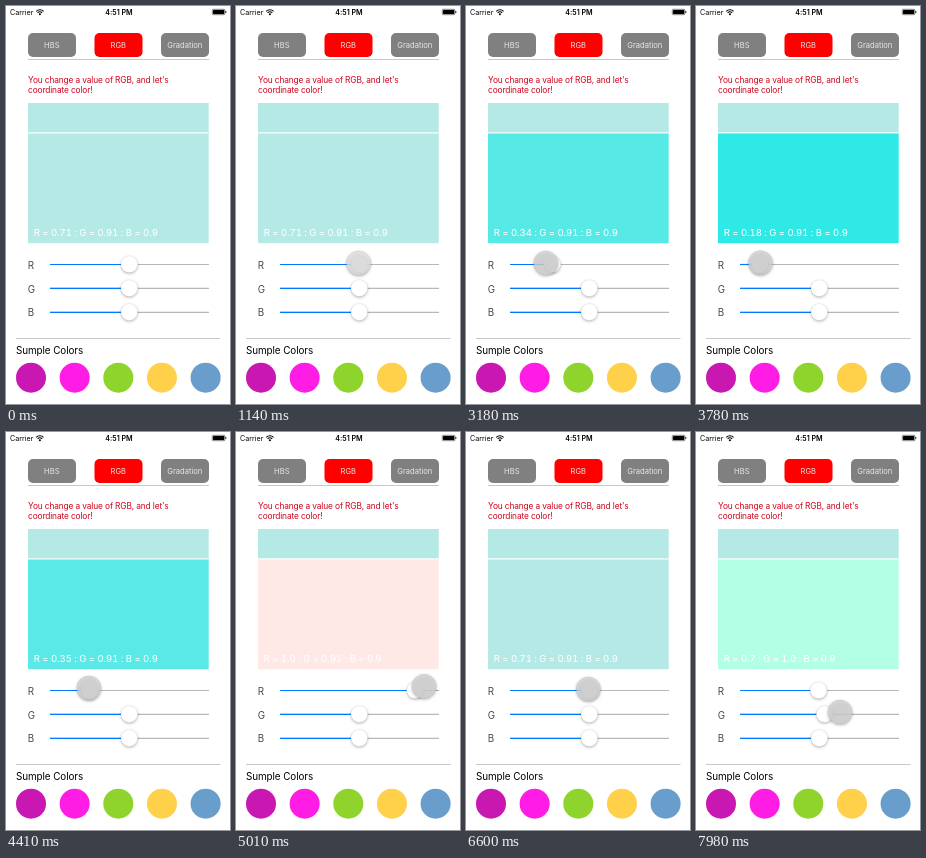
Recreate the animation shown at these times as an HTML page. Size 224 px wide and 398 px high, loop 8 s.

```html
<!DOCTYPE html>
<html lang="en">
<head>
<meta charset="utf-8">
<title>RGB sliders</title>
<style>
  html, body { margin: 0; width: 100%; height: 100%; overflow: hidden; background: #fff; }
  svg { display: block; width: 224px; height: 398px; }
  text { font-family: Inter, Roboto, "Liberation Sans", sans-serif; white-space: pre; }
  .status { font-size: 7.17px; }
  .button { font-size: 7.6px; fill: #e6e6e6; text-anchor: middle; }
  .hint { font-size: 8.36px; letter-spacing: -.13px; fill: #d0021b; }
  .value { font-size: 9.56px; letter-spacing: -.07px; fill: #fff; font-variant-numeric: tabular-nums; }
  .label { font-size: 9.8px; fill: #4a4a4a; }
  .heading { font-size: 9.9px; letter-spacing: -.08px; }
  .thumb { fill: #fff; stroke: rgba(0,0,0,.1); stroke-width: .4; filter: drop-shadow(0 1.6px 1.5px rgba(0,0,0,.3)); }
  #cursor { filter: drop-shadow(0 1px 1.5px rgba(0,0,0,.38)); }
</style>
</head>
<body>
<svg viewBox="0 0 224 398">
  <rect width="224" height="398" fill="#fff"/>

  <text class="status" x="4" y="8.8">Carrier</text>
  <g fill="none" stroke="#000" stroke-width="1.1">
    <path d="M30.2 5.3a5.2 5.2 0 0 1 7.4 0M31.6 6.9a3.3 3.3 0 0 1 4.6 0"/>
    <circle cx="33.9" cy="8.3" r=".5"/>
  </g>
  <text class="status" x="113" y="8.8" text-anchor="middle" font-weight="600">4:51 PM</text>
  <rect x="206.3" y="3.3" width="12.6" height="5.4" rx="1" fill="none" stroke="#000" stroke-width=".5"/>
  <rect x="207" y="4" width="11.2" height="4" rx=".4"/>
  <rect x="219.4" y="5" width=".9" height="2" rx=".4"/>

  <g id="buttons"></g>
  <path d="M22 53.5H203" stroke="#c8c8c8"/>
  <text class="hint" x="22" y="76.8">You change a value of RGB, and let's</text>
  <text class="hint" x="22" y="86.8">coordinate color!</text>

  <rect id="before" x="22" y="97" width="180.7" height="30"/>
  <rect id="after" x="22" y="127" width="180.7" height="110.2"/>
  <path d="M22 126.85H202.7" stroke="#fff" stroke-width="1.2" stroke-opacity=".9"/>
  <text id="value" class="value" x="27.8" y="230"></text>

  <g id="sliders"></g>
  <path d="M10 332.5H214.5" stroke="#c8c8c8"/>
  <text class="heading" x="10" y="347.8">Sumple Colors</text>
  <g id="samples"></g>

  <circle id="cursor" r="12" fill-opacity=".78" stroke="#999" stroke-opacity=".4" stroke-width=".5"/>
</svg>
<script>
const LOOP = 8000, STEP = 30;
const TRACK_START = 44, TRACK_END = 203;
const PER_PIXEL = 0.009;
const VALUE_LAG = 12, THUMB_LAG = 50;
const START = { r: 0.71, g: 0.912, b: 0.9 };
const GRAB_R = { x: 122.6, from: 2070, to: 6900 };
const GRAB_G = { x: 124, from: 7620, to: LOOP };

// The pointer rests, then eases to the next place
const ORIGIN = { x: 192, y: 281 };
const MOVES = [
  { from: 330, to: 360, x: 171, y: 288 },
  { from: 510, to: 800, x: 105, y: 270 },
  { from: 800, to: 960, x: GRAB_R.x, y: 257 },
  { from: 2070, to: 2790, x: 100.8, y: 257 },
  { from: 2910, to: 3450, x: 59, y: 257 },
  { from: 3480, to: 4440, x: 83, y: 256 },
  { from: 4440, to: 5190, x: 206, y: 254 },
  { from: 5340, to: 6210, x: 124, y: 257 },
  { from: 6210, to: 6780, x: 121.9, y: 257 },
  { from: 6900, to: 7140, x: 123, y: 273 },
  { from: 7410, to: 7620, x: GRAB_G.x, y: 280 },
  { from: 7890, to: 8040, x: 155, y: 280 }
];

const $ = id => document.getElementById(id);
const clamp = (v, lo, hi) => Math.min(hi, Math.max(lo, v));

function ease(t, from, to) {
  const u = clamp((t - from) / (to - from), 0, 1);
  return u * u * (3 - 2 * u);
}

function pointer(t) {
  return MOVES.reduce((p, m) => {
    const k = ease(t, m.from, m.to);
    return { x: p.x + (m.x - p.x) * k, y: p.y + (m.y - p.y) * k };
  }, ORIGIN);
}

// Distance the pointer has dragged since the grab
const dragged = (t, grab) => pointer(clamp(t, grab.from, grab.to)).x - grab.x;

function add(parent, tag, attrs, text) {
  const node = document.createElementNS("http://www.w3.org/2000/svg", tag);
  for (const key in attrs) node.setAttribute(key, attrs[key]);
  if (text) node.textContent = text;
  return parent.appendChild(node);
}

function format(v) {
  const s = String(Math.round(v * 100) / 100);
  return s.includes(".") ? s : s + ".0";
}

const rgb = (...parts) => `rgb(${parts.map(v => Math.round(v * 255))})`;

["HBS", "RGB", "Gradation"].forEach((name, i) => {
  const x = 22 + i * 66.5;
  add($("buttons"), "rect", { x, y: 27, width: 48, height: 24, rx: 5, fill: i === 1 ? "#f00" : "#808080" });
  add($("buttons"), "text", { class: "button", x: x + 23.8, y: 41.8 }, name);
});

const sliders = ["R", "G", "B"].map((name, i) => {
  const y = 258.5 + i * 23.9, group = $("sliders");
  add(group, "text", { class: "label", x: 21.8, y: y + 4.1 }, name);
  add(group, "path", { d: `M${TRACK_START} ${y}H${TRACK_END}`, stroke: "#b7b7b7", "stroke-width": 1.2 });
  const fill = add(group, "path", { stroke: "#007aff", "stroke-width": 1.2 });
  const thumb = add(group, "circle", { class: "thumb", cy: y - 0.2, r: 8.3 });
  return offset => {
    const x = clamp(123.3 + offset, TRACK_START + 8, TRACK_END - 8);
    fill.setAttribute("d", `M${TRACK_START} ${y}H${x}`);
    thumb.setAttribute("cx", x);
  };
});

["#c918b2", "#ff1ce4", "#8ed42c", "#ffd04a", "#689dcc"].forEach((fill, i) =>
  add($("samples"), "circle", { cx: 25 + i * 43.65, cy: 371.7, r: 15, fill }));

$("before").setAttribute("fill", rgb(START.r, START.g, START.b));
sliders[2](0);

function draw(t) {
  const channel = (start, grab) => clamp(start + dragged(t - VALUE_LAG, grab) * PER_PIXEL, 0, 1);
  const r = channel(START.r, GRAB_R), g = channel(START.g, GRAB_G);
  $("after").setAttribute("fill", rgb(r, g, START.b));
  $("value").textContent = `R = ${format(r)} : G = ${format(g)} : B = ${format(START.b)}`;
  sliders[0](dragged(t - THUMB_LAG, GRAB_R));
  sliders[1](dragged(t - THUMB_LAG, GRAB_G));

  const { x, y } = pointer(t);
  const press = ease(t, 1110, 1200) - ease(t, 6900, 6960) + ease(t, 7530, 7620);
  const cursor = $("cursor");
  cursor.setAttribute("visibility", t < MOVES[0].from ? "hidden" : "visible");
  cursor.setAttribute("cx", x);
  cursor.setAttribute("cy", y);
  cursor.setAttribute("fill", rgb(...Array(3).fill(0.92 - 0.08 * press)));
}

const begin = performance.now();
function tick() {
  const t = (performance.now() - begin) % LOOP;
  draw(Math.floor(t / STEP) * STEP);
  requestAnimationFrame(tick);
}
tick();
</script>
</body>
</html>
```
